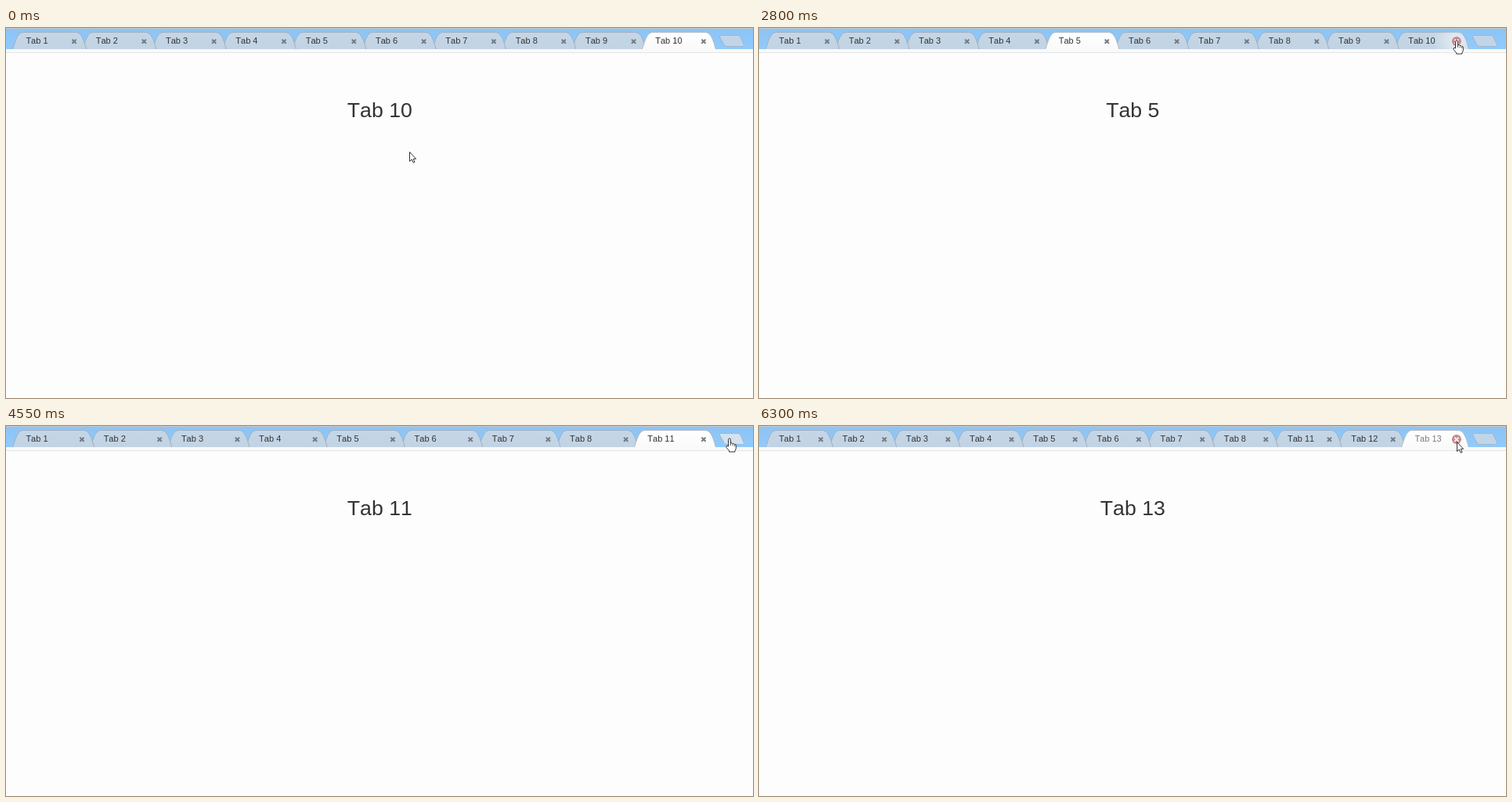
Animation, 954 px wide and 473 px high, one loop 6.65 s. Source, as an HTML page:

```html
<!DOCTYPE html>
<html lang="en">
<head>
<meta charset="utf-8">
<title>Tabs</title>
<style>
html, body { margin: 0; width: 100%; height: 100%; overflow: hidden; background: #fdfdfd; }
svg { display: block; width: 954px; height: 473px; }
text { font-family: Arial, "Liberation Sans", sans-serif; font-kerning: none; fill: #333; }
.label { font-size: 11px; }
.dim { fill: #7c7c7c; }
.title { font-size: 26.67px; text-anchor: middle; }
.tab { fill: url(#idle); stroke: #9fb0c1; }
.tab.on { fill: url(#active); stroke: #b0bac4; }
.x { stroke: #737a82; stroke-width: 2; fill: none; }
.x.hot { stroke: #fff; stroke-width: 1.6; }
.add { fill: #c2d5e8; stroke: #9db6cd; }
.add.hot { fill: #d3e2f0; }
.cursor path { fill: #fff; stroke: #333; stroke-linejoin: round; }
</style>
</head>
<body>
<svg viewBox="0 0 954 473">
  <defs>
    <linearGradient id="strip" x2="0" y2="1">
      <stop stop-color="#8dc3f5"/><stop offset="1" stop-color="#90cafc"/>
    </linearGradient>
    <linearGradient id="idle" x2="0" y2="1">
      <stop stop-color="#c5d6e6"/><stop offset="1" stop-color="#c1d3e4"/>
    </linearGradient>
    <linearGradient id="active" x2="0" y2="1">
      <stop stop-color="#fff"/><stop offset="1" stop-color="#f9faf9"/>
    </linearGradient>
    <radialGradient id="glow">
      <stop stop-color="#fff" stop-opacity=".6"/><stop offset="1" stop-color="#fff" stop-opacity="0"/>
    </radialGradient>
  </defs>
  <rect width="954" height="473" fill="#fdfdfd"/>
  <rect width="954" height="27" fill="url(#strip)"/>
  <rect width="954" height="1" fill="#c6c6c6"/>
  <rect y="27" width="954" height="4" fill="#f8f9f9"/>
  <rect y="31" width="954" height="1" fill="#e3e5e6"/>
  <g id="tabs"></g>
  <text id="title" class="title" x="477.3" y="114"></text>
  <g id="cursor" class="cursor"></g>
</svg>
<script>
const STEP = 350, LOOP = 6650, LEFT = 8, SPAN = 893.2, OVERLAP = 5.7;
const $ = id => document.getElementById(id);

const upTo = n => Array.from({ length: n }, (_, i) => i + 1);
const ten = upTo(10), nine = upTo(9), eight = upTo(8);
const plus = (...more) => [...eight, ...more];

// tabs, active tab, cursor kind, cursor x, cursor y, hovered part
const steps = [
  [ten, 10, 'arrow', 515, 158],
  [ten, 10, 'arrow', 553, 118],
  [ten, 10, 'hand', 583, 18, 7],
  [ten, 10, 'hand', 579, 14, 7],
  [ten, 7, 'arrow', 575, 15, 7],
  [ten, 5, 'arrow', 408, 14, 5],
  [ten, 5, 'arrow', 449, 13, 5],
  [ten, 5, 'hand', 760, 15, 9],
  [ten, 5, 'hand', 891, 16, 'close'],
  [nine, 5, 'hand', 891, 16, 'close'],
  [nine, 5, 'hand', 891, 16, 'close'],
  [eight, 5, 'hand', 891, 16, 8],
  [eight, 5, 'hand', 924, 16, 'add'],
  [plus(11), 11, 'hand', 924, 16, 'add'],
  [plus(11, 12), 12, 'hand', 924, 16, 'add'],
  [plus(11, 12, 13), 13, 'hand', 924, 16, 'add'],
  [plus(11, 12, 13), 13, 'hand', 924, 16, 'add'],
  [plus(11, 12, 13), 13, 'arrow', 897, 21, 'close'],
  [plus(11, 12, 13), 13, 'arrow', 891, 20, 'close']
];

const cursors = {
  arrow: '<path d="M.5.5V12.5L3.3 10 5.2 14.2 7 13.4 5.2 9.3H8.6Z"/>',
  hand: `<path d="M-1.5 10V1.5Q-1.5 0 0 0T1.5 1.5V6Q3.5 5 4.2 6.7 6 6 6.6 7.5
    8.3 7 8.3 9V12Q8.3 14 7 15.5V17H-.5V15.5L-4 11.5Q-4.5 9.5-2.8 9.3Z"/>
    <path d="M1.5 6V9M4.2 6.7V9.5M6.6 7.5V10" stroke-width=".8"/>`
};

const tabPath = w =>
  `M.5 27C4 18 6 5.5 14 5.5H${w - 14}C${w - 7} 5.5 ${w - 4} 14 ${w - 0.5} 27`;

function closeMark(cx, hot) {
  const disc = hot ? `<circle cx="${cx}" cy="17" r="6" fill="#c68a92"/>` : '';
  return `${disc}<path class="x${hot ? ' hot' : ''}"
    d="M${cx - 2.6} 14.6l5.2 5.2m0-5.2l-5.2 5.2"/>`;
}

function drawTab(id, i, [tabs, active, , mx, , hover]) {
  const pitch = SPAN / tabs.length, w = pitch + OVERLAP, x = LEFT + i * pitch;
  const on = id === active;
  const hot = hover === 'close' && i === tabs.length - 1;
  const over = hot || hover === id;
  const path = tabPath(w);
  const glow = over && !on
    ? `<clipPath id="clip"><path d="${path}"/></clipPath>
       <circle cx="${mx - x}" cy="17" r="32" fill="url(#glow)" clip-path="url(#clip)"/>`
    : '';
  return `<g transform="translate(${x} 0)">
    <path class="tab${on ? ' on' : ''}" d="${path}"/>${glow}
    <text class="label${over && on ? ' dim' : ''}" x="17.4" y="20">Tab ${id}</text>
    ${closeMark(w - 16, hot)}</g>`;
}

function draw(state) {
  const [tabs, active, kind, mx, my, hover] = state;
  const order = tabs.map((id, i) => [id, i]).reverse()
    .sort((a, b) => (a[0] === active) - (b[0] === active));
  $('tabs').innerHTML = order.map(([id, i]) => drawTab(id, i, state)).join('') +
    `<path class="add${hover === 'add' ? ' hot' : ''}"
      d="M913 9.5H935Q937 9.5 938 11.5L942.5 21.5Q943 23.5 941 23.5H920Q918 23.5 917 21.5L911.5 11.5Q911 9.5 913 9.5Z"/>`;
  $('title').textContent = 'Tab ' + active;
  $('cursor').innerHTML = cursors[kind];
  $('cursor').setAttribute('transform', `translate(${mx} ${my})`);
}

let shown = -1;
function tick() {
  const n = Math.floor(performance.now() % LOOP / STEP);
  if (n !== shown) draw(steps[shown = n]);
  requestAnimationFrame(tick);
}
tick();
</script>
</body>
</html>
```
